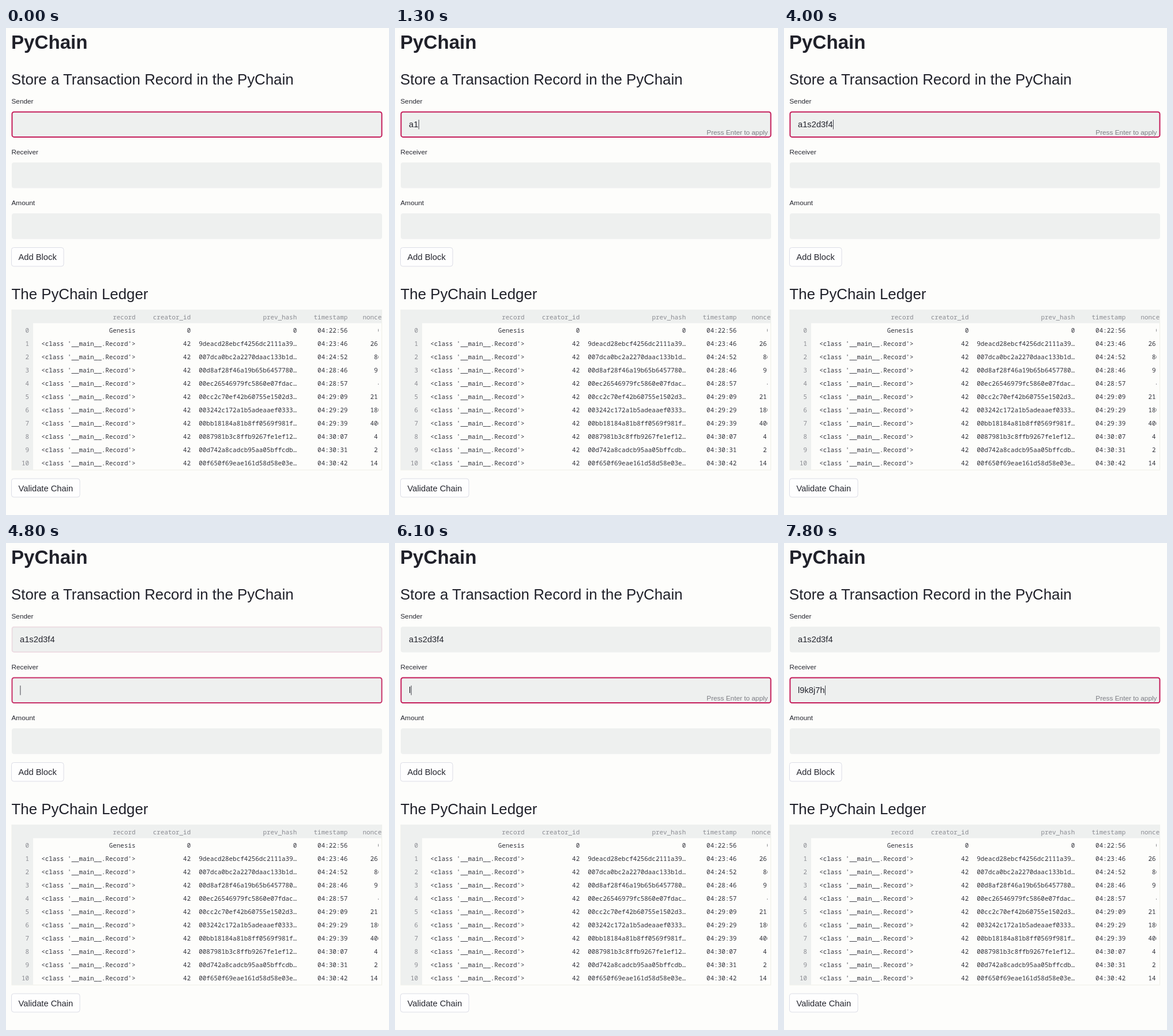
An HTML page that plays this animation: 664x844 px, repeating every 8 s.

```html
<!DOCTYPE html>
<html lang="en">
<head>
<meta charset="utf-8">
<title>PyChain</title>
<style>
  html, body { margin: 0; width: 100%; height: 100%; overflow: hidden; background: #fdfdfb; }
  svg { display: block; width: 664px; height: 844px; }
  text { font-family: "Liberation Sans", Arial, sans-serif; font-size: 14.72px; fill: #25262f; white-space: pre; }
  .h1 { font-size: 33.12px; font-weight: 700; }
  .h2 { font-size: 25.84px; }
  .h1, .h2 { fill: #20212a; }
  .label { font-size: 11.78px; }
  .hint { font-size: 11.8px; fill: #7b7c83; text-anchor: end; }
  .mono text { font-family: "Noto Sans Mono", "DejaVu Sans Mono", monospace; font-size: 10.9px; fill: #2f3039; text-anchor: end; }
  .mono .dim { fill: #8a8b92; }
  .shade { fill: #eef0ef; }
  .focus { fill: none; stroke: #c41c5a; stroke-width: 2; }
  .button { fill: #fefefe; stroke: #dcdde6; }
  .frame { fill: none; stroke: #efefe6; }
  .caret { fill: #44454e; }
</style>
</head>
<body>
<svg viewBox="0 0 664 844">
  <defs><clipPath id="cut"><rect x="600" y="512" width="46" height="254"/></clipPath></defs>
  <text class="h1" x="9" y="36">PyChain</text>
  <text class="h2" x="9" y="98">Store a Transaction Record in the PyChain</text>
  <g id="fields"></g>
  <rect class="button" x="9.5" y="380.5" width="90.5" height="32.5" rx="4"/>
  <text x="21.5" y="402">Add Block</text>
  <text class="h2" x="9.5" y="470">The PyChain Ledger</text>
  <g class="mono" id="ledger">
    <rect class="frame" x="10" y="488.5" width="641.5" height="277.5"/>
    <rect class="shade" x="10" y="488" width="641.5" height="23.5"/>
    <rect class="shade" x="10" y="488" width="37" height="278"/>
  </g>
  <rect class="button" x="9.5" y="781" width="118.5" height="32" rx="4"/>
  <text x="21.5" y="802.5">Validate Chain</text>
</svg>
<script>
const LOOP = 8000, FADE = 200, SWITCH = 4640;

function add(parent, tag, attrs, text = "") {
  const node = document.createElementNS("http://www.w3.org/2000/svg", tag);
  for (const key in attrs) node.setAttribute(key, attrs[key]);
  node.textContent = text;
  parent.append(node);
  return node;
}

// Ledger: previous hash, time and nonce of each block
const ledger = document.getElementById("ledger");
const columns = [224.5, 320.2, 504.2, 592.4, 651.2];
const blocks = [
  ["0", "04:22:56", "0"],
  ["9deacd28ebcf4256dc2111a39…", "04:23:46", "261"],
  ["007dca0bc2a2270daac133b1d…", "04:24:52", "86"],
  ["00d8af28f46a19b65b6457780…", "04:28:46", "91"],
  ["00ec26546979fc5860e07fdac…", "04:28:57", "4"],
  ["00cc2c70ef42b60755e1502d3…", "04:29:09", "211"],
  ["003242c172a1b5adeaaef0333…", "04:29:29", "180"],
  ["00bb18184a81b8ff0569f981f…", "04:29:39", "406"],
  ["0087981b3c8ffb9267fe1ef12…", "04:30:07", "41"],
  ["00d742a8cadcb95aa05bffcdb…", "04:30:31", "21"],
  ["00f650f69eae161d58d58e03e…", "04:30:42", "141"]
];

["record", "creator_id", "prev_hash", "timestamp", "nonce"].forEach((name, i) =>
  add(ledger, "text", { class: "dim", x: columns[i], y: 504.5 }, name));

blocks.forEach((block, row) => {
  const y = 527.8 + row * 23.05;
  const start = row ? ["<class '__main__.Record'>", "42"] : ["Genesis", "0"];
  add(ledger, "text", { class: "dim", x: 40, y }, row);
  [...start, ...block].forEach((value, i) => {
    const cell = add(ledger, "text", { x: columns[i], y }, value);
    if (i === 4) cell.setAttribute("clip-path", "url(#cut)");
  });
});

// Form fields
const group = document.getElementById("fields");
const [sender, receiver] = ["Sender", "Receiver", "Amount"].map((label, i) => {
  const y = 145 + i * 88.1;
  add(group, "text", { class: "label", x: 9.5, y: y - 14 }, label);
  add(group, "rect", { class: "shade", x: 10, y, width: 642, height: 44.5, rx: 4 });
  return {
    ring: add(group, "rect", { class: "focus", x: 10.5, y: y + 0.4, width: 641, height: 43.5, rx: 3.5, opacity: 0 }),
    value: add(group, "text", { x: 24, y: y + 27 }),
    hint: add(group, "text", { class: "hint", x: 646.5, y: y + 39.5, opacity: 0 }, "Press Enter to apply"),
    caret: add(group, "rect", { class: "caret", y: y + 14, width: 1, height: 16.5, opacity: 0 })
  };
});

Object.assign(sender, { word: "a1s2d3f4", keys: [900, 1200, 1500, 1800, 2100, 2400, 2700, 3000], blink: -900 });
Object.assign(receiver, { word: "l9k8j7h", keys: [6000, 6400, 6700, 7000, 7300, 7500, 7700], blink: 4790 });

const ease = x => x * x * (3 - 2 * x);

function update(field, t, active, ring) {
  const typed = field.keys.filter(k => k <= t).length;
  const since = t - (typed ? field.keys[typed - 1] : field.blink);
  const lit = active && since >= 0 && since % 1000 < 500;
  field.value.textContent = field.word.slice(0, typed);
  const width = typed ? field.value.getComputedTextLength() : 0;
  field.caret.setAttribute("x", 24.4 + width);
  field.caret.setAttribute("opacity", +lit);
  field.hint.setAttribute("opacity", +(active && typed > 0));
  field.ring.setAttribute("opacity", ring);
}

const origin = performance.now();
function draw() {
  const t = (performance.now() - origin) % LOOP;
  const fade = ease(Math.min(1, Math.max(0, (t - SWITCH) / FADE)));
  update(sender, t, t < SWITCH, 1 - fade);
  update(receiver, t, t >= SWITCH, fade);
  requestAnimationFrame(draw);
}
draw();
</script>
</body>
</html>
```
